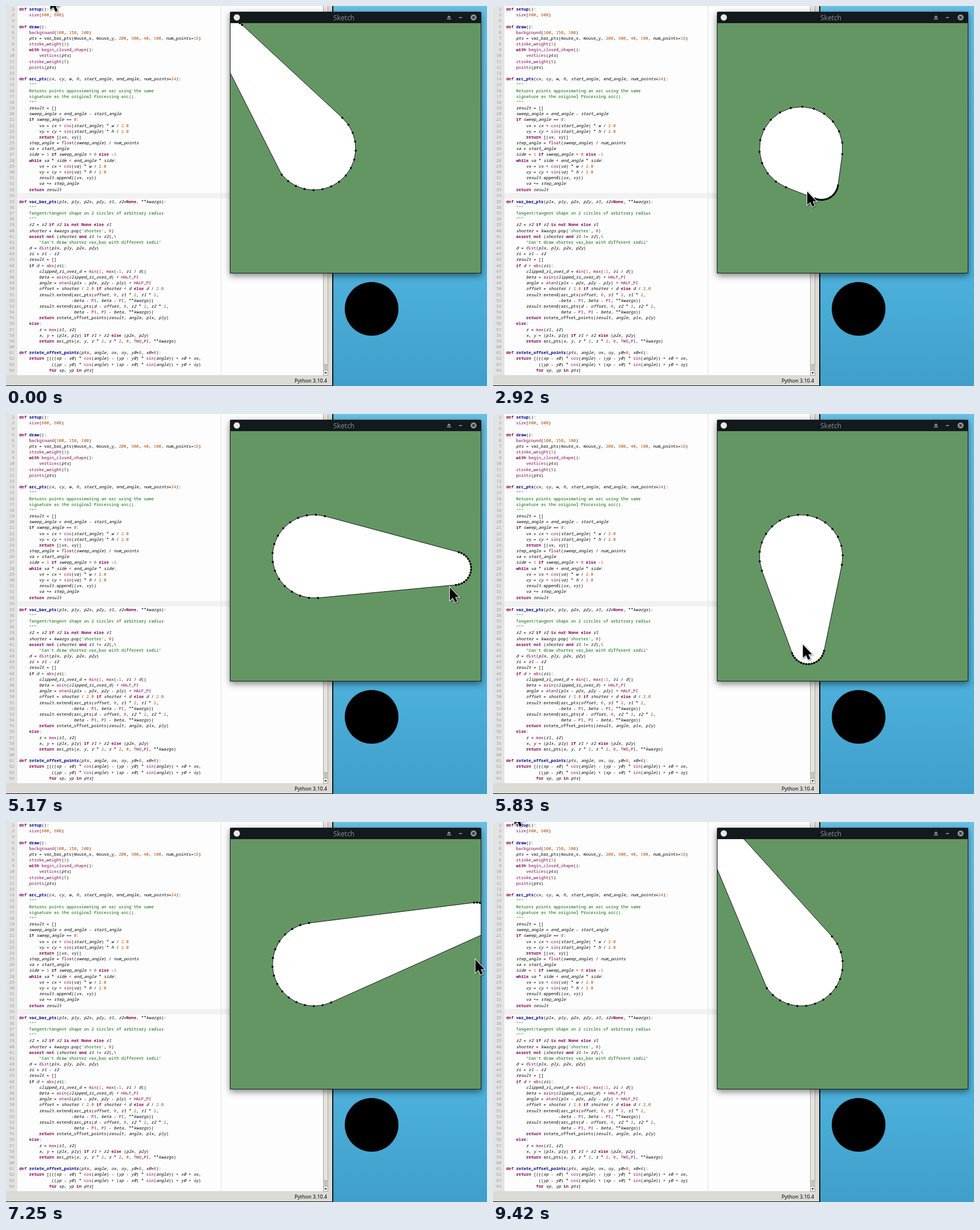
An HTML page that plays this animation: 842 px wide and 665 px high, repeating every 9660 ms.

```html
<!DOCTYPE html>
<html lang="en">
<head>
<meta charset="utf-8">
<title>Variable bar sketch</title>
<style>
  html, body { margin: 0; width: 100%; height: 100%; overflow: hidden; }
  #stage { position: relative; width: 842px; height: 665px; overflow: hidden;
    background: linear-gradient(#68c0e4, #4cb0da 72%, #3f9fca); }
  #stage > *, #editor > *, #window > * { position: absolute; }
  #editor { left: 0; top: 0; width: 571px; height: 664px; background: #dcdad5;
    border-right: 2px solid #111; border-bottom: 1px solid #111; }
  #page { left: 20px; top: 0; width: 535px; height: 646px; background: #fdfdfd; }
  #gutter { left: 0; top: 0; width: 20px; height: 646px; background: #e3e3e3; }
  #current { left: 20px; top: 327px; width: 535px; height: 10px; background: #f2f2f2; }
  #margin { left: 376px; top: 0; width: 1px; height: 646px; background: #e2e2e2; }
  pre { margin: 0; top: .1px; font: 10px/14.02px "Noto Sans Mono", monospace;
    transform: scale(.7271); transform-origin: 0 0; color: #000; }
  #numbers { left: 0; width: 20px; text-align: right; color: #999; }
  #code { left: 23.4px; }
  .key { color: #7f0055; font-weight: bold; }
  .def { color: #00008b; font-weight: bold; }
  .builtin { color: #7f0055; }
  .number { color: #b04600; }
  .string { color: #006400; }
  .local { font-style: italic; }
  #python { right: 9px; top: 649px; font: 8.9px/14px "Noto Sans", sans-serif; color: #000; }
  #emblem { left: 593px; top: 483px; width: 94px; height: 94px; border-radius: 50%; background: #000; }
  #window { left: 392px; top: 10px; width: 440px; height: 458px; background: #131a1d;
    border-radius: 2px 2px 0 0; box-shadow: 0 4px 12px rgba(0, 0, 0, .5); }
  #title { left: 0; top: 0; width: 399px; height: 20px; text-align: center;
    font: 11.9px/20px "Noto Sans", sans-serif; color: #828c8f; }
  #sketch { left: 1px; top: 20px; background: #649664; }
</style>
</head>
<body>
<div id="stage">
  <div id="emblem"></div>
  <div id="editor">
    <div id="page"></div>
    <div id="gutter"></div>
    <div id="current"></div>
    <div id="margin"></div>
    <svg style="left:555px;top:0" width="9" height="647">
      <rect width="9" height="647" fill="#c6c3bd"/>
      <rect x=".5" y="-2" width="8" height="629.5" fill="#e6e4e0" stroke="#aaa7a1"/>
      <rect x=".5" y="637.5" width="8" height="9" fill="#eeece8" stroke="#aaa7a1"/>
      <path d="M2.3 641h4.4l-2.2 2.6z"/>
    </svg>
    <pre id="numbers"></pre>
<pre id="code">def setup():
    size(600, 600)

def draw():
    background(100, 150, 100)
    pts = var_bar_pts(mouse_x, mouse_y, 200, 300, 40, 100, num_points=16)
    stroke_weight(1)
    with begin_closed_shape():
        vertices(pts)
    stroke_weight(5)
    points(pts)

def arc_pts(cx, cy, w, h, start_angle, end_angle, num_points=24):
    """
    Returns points approximating an arc using the same
    signature as the original Processing arc().
    """
    result = []
    sweep_angle = end_angle - start_angle
    if sweep_angle == 0:
        vx = cx + cos(start_angle) * w / 2.0
        vy = cy + sin(start_angle) * h / 2.0
        return [(vx, vy)]
    step_angle = float(sweep_angle) / num_points
    va = start_angle
    side = 1 if sweep_angle &gt; 0 else -1
    while va * side &lt; end_angle * side:
        vx = cx + cos(va) * w / 2.0
        vy = cy + sin(va) * h / 2.0
        result.append((vx, vy))
        va += step_angle
    return result

def var_bar_pts(p1x, p1y, p2x, p2y, r1, r2=None, **kwargs):
    """
    Tangent/tangent shape on 2 circles of arbitrary radius
    """
    r2 = r2 if r2 is not None else r1
    shorter = kwargs.pop('shorter', 0)
    assert not (shorter and r1 != r2),\
        "Can't draw shorter var_bar with different radii"
    d = dist(p1x, p1y, p2x, p2y)
    ri = r1 - r2
    result = []
    if d &gt; abs(ri):
        clipped_ri_over_d = min(1, max(-1, ri / d))
        beta = asin(clipped_ri_over_d) + HALF_PI
        angle = atan2(p1x - p2x, p2y - p1y) + HALF_PI
        offset = shorter / 2.0 if shorter &lt; d else d / 2.0
        result.extend(arc_pts(offset, 0, r1 * 2, r1 * 2,
                     -beta - PI, beta - PI, **kwargs))
        result.extend(arc_pts(d - offset, 0, r2 * 2, r2 * 2,
                      beta - PI, PI - beta, **kwargs))
        return rotate_offset_points(result, angle, p1x, p1y)
    else:
        r = max(r1, r2)
        x, y = (p1x, p1y) if r1 &gt; r2 else (p2x, p2y)
        return arc_pts(x, y, r * 2, r * 2, 0, TWO_PI, **kwargs)

def rotate_offset_points(pts, angle, ox, oy, y0=0, x0=0):
    return [(((xp - x0) * cos(angle) - (yp - y0) * sin(angle)) + x0 + ox,
             ((yp - y0) * cos(angle) + (xp - x0) * sin(angle)) + y0 + oy)
            for xp, yp in pts]</pre>
    <div id="python">Python 3.10.4</div>
  </div>
  <div id="window">
    <div id="title">Sketch</div>
    <svg width="440" height="20">
      <circle cx="12" cy="10" r="5.5" fill="#e8e8e8"/>
      <path d="M380 10.5l3.5-4 3.5 4zM380 12h7v1.4h-7zM401 9.6h5v1.4h-5z" fill="#9aa3a5"/>
      <circle cx="426.5" cy="10" r="5.3" fill="#8b9496"/>
      <path d="M424.5 8l4 4m0-4l-4 4" stroke="#131a1d" stroke-width="1.2"/>
    </svg>
    <svg id="sketch" width="438" height="437" viewBox="393 30 438 437">
      <path id="bar" fill="#fff" stroke="#000" stroke-width=".9"/>
      <path id="dots" fill="none" stroke="#000" stroke-width="3.7" stroke-linecap="round"/>
    </svg>
  </div>
  <svg width="842" height="665" style="left:0;top:0">
    <g id="cursor">
      <path d="M-.5-.5V22.5L5 18 8.5 26 12.5 24.2 9 16.5H15.5Z" stroke="#fff" stroke-width="2"
        paint-order="stroke" style="filter:drop-shadow(1px 1px 1px rgba(0,0,0,.5))"/>
    </g>
  </svg>
</div>
<script>
const $ = id => document.getElementById(id);
const words = text => new Set(text.split(' '));

// ---- code colouring
const KEYWORDS = words('def with if return else while is not None assert and for in');
const BUILTINS = words('size background stroke_weight begin_closed_shape vertices points ' +
  'cos sin float dist abs min max asin atan2 HALF_PI PI TWO_PI');
const LOCALS = words('pts cx cy w h start_angle end_angle num_points result sweep_angle vx vy step_angle ' +
  'va side p1x p1y p2x p2y r1 r2 kwargs shorter d ri clipped_ri_over_d beta angle offset r x y ox oy y0 x0 xp yp');
const TOKEN = /"""[^]*?"""|"[^"]*"|'[^']*'|[A-Za-z_]\w*|\d+(\.\d+)?|[^]/g;

function tokenClass(token, before) {
  if (/^["']/.test(token)) return 'string';
  if (/^\d/.test(token)) return 'number';
  if (before.endsWith('def ')) return 'def';
  if (KEYWORDS.has(token)) return 'key';
  if (BUILTINS.has(token)) return 'builtin';
  if (LOCALS.has(token) && !before.endsWith('100, ')) return 'local';
  return '';
}

const source = $('code').textContent;
$('code').textContent = '';
for (const match of source.matchAll(TOKEN)) {
  const span = document.createElement('span');
  span.textContent = match[0];
  span.className = tokenClass(match[0], source.slice(0, match.index));
  $('code').append(span);
}
$('numbers').textContent = Array.from({ length: 63 }, (_, i) => i + 2).join('\n');

// ---- pointer path: [step, x, y], twelve steps per second
const PATH = [
  [0, 78, -16], [1, 78, -16], [2, 77, -16], [3, 77, -16], [7, 400, 70], [10, 560, 170],
  [13, 715, 190], [14, 763, 172], [15, 775, 158], [16, 793, 146], [17, 791, 133], [18, 788, 125],
  [20, 725, 165], [23, 616, 255], [31, 616, 255], [34, 575, 310], [37, 495, 350], [40, 449, 372],
  [42, 485, 383], [45, 590, 350], [48, 650, 300], [51, 570, 250], [52, 556, 244], [54, 560, 236],
  [57, 660, 215], [61, 785, 270], [64, 735, 385], [66, 647, 417], [69, 551, 408.5], [70, 543, 404],
  [73, 490, 345], [77, 437, 150], [78, 440, 105], [80, 466, 63], [81, 502, 47], [84, 720, 80],
  [86, 823, 170], [88, 820, 310], [90, 781, 387], [93, 654, 299], [94, 646, 284], [98, 530, 150],
  [102, 404, 34.5], [103, 357, -16], [104, 340, -40], [111, 38, -40], [112, 38, -18], [116, 38, -18]
];

const slope = (i, axis) => PATH[i + 1] && PATH[i]
  ? (PATH[i + 1][axis] - PATH[i][axis]) / (PATH[i + 1][0] - PATH[i][0]) : 0;

// Monotone tangent, flat at turning points
function tangent(i, axis) {
  const a = slope(i - 1, axis), b = slope(i, axis);
  return a * b > 0 ? 2 * a * b / (a + b) : 0;
}

function pointer(step) {
  const i = PATH.findIndex((row, k) => PATH[k + 1][0] > step);
  const span = PATH[i + 1][0] - PATH[i][0];
  const u = (step - PATH[i][0]) / span;
  return [1, 2].map(axis =>
    PATH[i][axis] * (1 + 2 * u) * (1 - u) ** 2 + PATH[i + 1][axis] * u * u * (3 - 2 * u) +
    span * u * (1 - u) * (tangent(i, axis) * (1 - u) - tangent(i + 1, axis) * u));
}

const inSketch = ([x, y]) => x >= 393 && y >= 30;

// The sketch sees the pointer one step late and only inside its window
function mouse(step) {
  for (let k = step - 1; k >= 0; k--) {
    if (inSketch(pointer(k))) return pointer(k);
  }
  return [393.5, 54.5];
}

// ---- the bar
const SCALE = .729, COUNT = 16;
const R1 = 40 * SCALE, R2 = 100 * SCALE, P2 = [393.5 + 200 * SCALE, 30.5 + 300 * SCALE];

const arc = ([cx, cy], r, start, end, withEnd) => Array.from({ length: COUNT + withEnd }, (_, i) => {
  const a = start + (end - start) * i / COUNT;
  return [cx + Math.cos(a) * r, cy + Math.sin(a) * r];
});

// The large arc loses its end point while the pointer is out of the window
function barPoints(p1, pointerInside) {
  const dx = P2[0] - p1[0], dy = P2[1] - p1[1], d = Math.hypot(dx, dy);
  if (d <= R2 - R1) return arc(P2, R2, 0, 2 * Math.PI, 0);
  const angle = Math.atan2(dy, dx);
  const beta = Math.asin((R1 - R2) / d) + Math.PI / 2;
  return [
    ...arc(p1, R1, angle - beta - Math.PI, angle + beta - Math.PI, 1),
    ...arc(P2, R2, angle + beta - Math.PI, angle + Math.PI - beta, pointerInside ? 1 : 0)
  ];
}

// ---- playback
const LOOP = 9660;
let shown = -1;

function frame() {
  const step = Math.min(115, Math.floor((performance.now() % LOOP + 4) * .012));
  if (step !== shown) {
    shown = step;
    const tip = pointer(step);
    const pts = barPoints(mouse(step), inSketch(tip)).map(p => p.map(v => v.toFixed(2)).join(' '));
    $('bar').setAttribute('d', 'M' + pts.join('L') + 'Z');
    $('dots').setAttribute('d', pts.map(p => `M${p}h.01`).join(''));
    $('cursor').setAttribute('transform', `translate(${tip})`);
  }
  requestAnimationFrame(frame);
}
frame();
</script>
</body>
</html>
```
